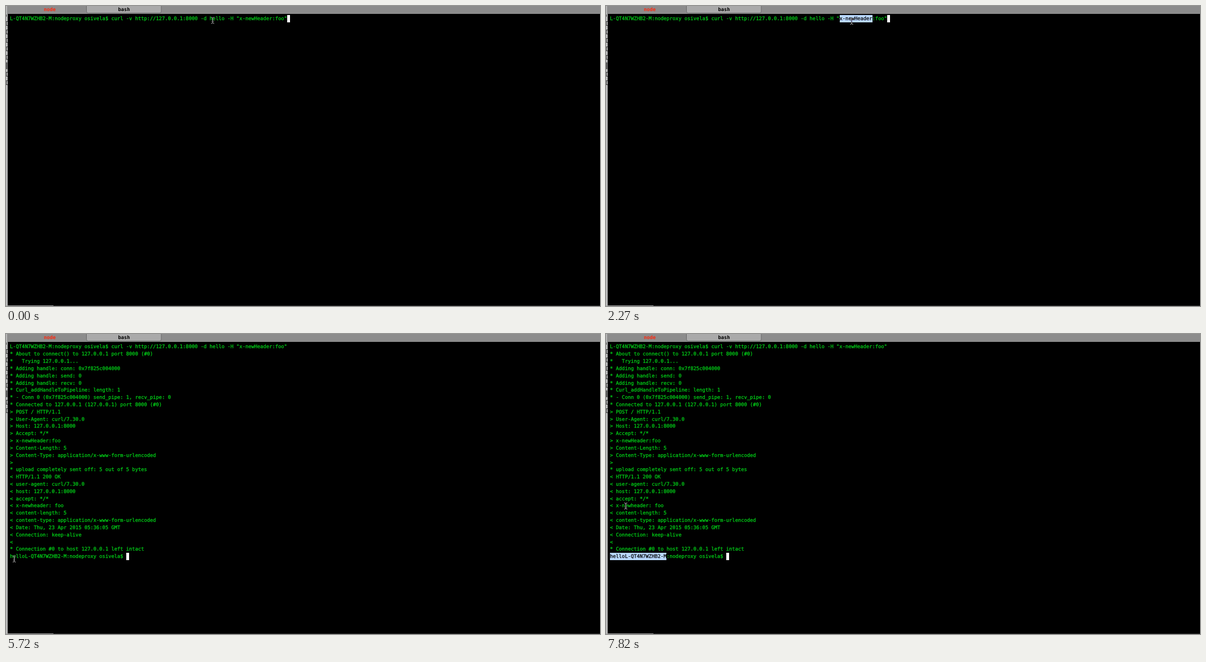
Animation, 1052 px wide and 532 px high, one loop 8000 ms. Source, as an HTML page with a canvas:

```html
<!DOCTYPE html>
<html lang="en">
<head>
<meta charset="utf-8">
<title>Terminal</title>
<style>
  html, body { margin: 0; width: 100%; height: 100%; overflow: hidden; background: #000; }
  canvas { display: block; }
</style>
</head>
<body>
<canvas id="stage" width="1052" height="532"></canvas>
<script>
const ctx = document.getElementById('stage').getContext('2d');
const LOOP = 8000, STEP = 150;
const LEFT = 7, TOP = 16, COL = 5.28, ROW = 12.82;
const FONT = '8.77px "DejaVu Sans Mono", monospace';

const prompt = 'L-QT4N7WZHB2-M:nodeproxy osivela$ ';
const lines = [
  prompt + 'curl -v http://127.0.0.1:8000 -d hello -H "x-newHeader:foo"',
  '* About to connect() to 127.0.0.1 port 8000 (#0)',
  '*   Trying 127.0.0.1...',
  '* Adding handle: conn: 0x7f825c004000',
  '* Adding handle: send: 0',
  '* Adding handle: recv: 0',
  '* Curl_addHandleToPipeline: length: 1',
  '* - Conn 0 (0x7f825c004000) send_pipe: 1, recv_pipe: 0',
  '* Connected to 127.0.0.1 (127.0.0.1) port 8000 (#0)',
  '> POST / HTTP/1.1',
  '> User-Agent: curl/7.30.0',
  '> Host: 127.0.0.1:8000',
  '> Accept: */*',
  '> x-newHeader:foo',
  '> Content-Length: 5',
  '> Content-Type: application/x-www-form-urlencoded',
  '>',
  '* upload completely sent off: 5 out of 5 bytes',
  '< HTTP/1.1 200 OK',
  '< user-agent: curl/7.30.0',
  '< host: 127.0.0.1:8000',
  '< accept: */*',
  '< x-newheader: foo',
  '< content-length: 5',
  '< content-type: application/x-www-form-urlencoded',
  '< Date: Thu, 23 Apr 2015 05:36:05 GMT',
  '< Connection: keep-alive',
  '<',
  '* Connection #0 to host 127.0.0.1 left intact',
  'hello' + prompt
];
const OUTPUT_AT = 3620;

const selections = [
  { from: 750, to: 2120, row: 0, word: 'hello' },
  { from: 2270, to: 5720, row: 0, word: 'x-newHeader' },
  { from: 5870, to: LOOP, row: 29, word: 'helloL-QT4N7WZHB2-M' }
];

// Pointer glides: start time, steps, bend point, end point, easing
const smooth = p => (1 - Math.cos(Math.PI * p)) / 2;
const slowing = p => Math.sin(Math.PI * p / 2);
const start = [366, 25.5];
const glides = [
  { at: 1370, steps: 4, bend: [400, 10], end: [435, 27], ease: smooth },
  { at: 4370, steps: 7, bend: [200, 215], end: [14.5, 399], ease: smooth },
  { at: 6170, steps: 3, bend: [38, 300], end: [56, 227], ease: smooth },
  { at: 6620, steps: 4, bend: [44, 272], end: [40, 312], ease: slowing },
  { at: 7220, steps: 5, bend: [35, 296], end: [35, 305], ease: smooth }
];

function pointerAt(t) {
  let pos = start;
  for (const g of glides) {
    if (t < g.at) break;
    const step = Math.min(Math.floor((t - g.at) / STEP) + 1, g.steps);
    const u = g.ease(step / g.steps), v = 1 - u;
    pos = pos.map((a, i) => a * v * v + 2 * u * v * g.bend[i] + g.end[i] * u * u);
  }
  return pos;
}

function rect(color, x, y, w, h) {
  ctx.fillStyle = color;
  ctx.fillRect(x, y, w, h);
}

// Fills character cells, snapped to whole pixels
function cells(color, row, col, count) {
  const x = Math.round(LEFT + col * COL);
  const right = Math.round(LEFT + (col + count) * COL);
  rect(color, x, Math.round(TOP + row * ROW), right - x, 13);
}

// A hairline stroke gives the glyphs their full weight
function text(str, row, col, color) {
  const x = LEFT + col * COL, y = TOP + row * ROW + 9.4;
  ctx.fillStyle = ctx.strokeStyle = color;
  ctx.lineWidth = 0.25;
  ctx.fillText(str, x, y);
  ctx.strokeText(str, x, y);
}

function drawWindow() {
  rect('#000', 0, 0, 1052, 532);
  rect('#b8b8b8', 0, 0, 3, 532);
  // Edges of the window behind
  for (let y = 27; y < 140; y += 15) {
    rect('#333', 0, y, 1, 8);
    rect('#333', 0, y, 3, 1);
    rect('#333', 0, y + 7, 3, 1);
  }
  rect('#777', 0, 100, 3, 12);
  rect('#333', 0, 100, 1, 12);
  rect('#444', 0, 15, 1, 4);
  rect('#a8a8a8', 0, 531, 84, 1);
  rect('#2a2a2a', 84, 531, 968, 1);
  rect('#8c8c8c', 2, 0, 1050, 14);

  ctx.beginPath();
  ctx.roundRect(142.5, -5, 132.5, 17.5, 3);
  ctx.fillStyle = '#aaa';
  ctx.fill();
  ctx.strokeStyle = '#686868';
  ctx.lineWidth = 1;
  ctx.stroke();

  ctx.font = 'bold ' + FONT;
  ctx.textAlign = 'center';
  ctx.fillStyle = '#ff2a10';
  ctx.fillText('node', 77.5, 9);
  ctx.fillStyle = '#000';
  ctx.fillText('bash', 209, 8.5);
  ctx.textAlign = 'left';
  ctx.font = FONT;
}

function drawPointer([x, y]) {
  ctx.save();
  ctx.translate(x, y);
  ctx.globalCompositeOperation = 'difference';
  ctx.strokeStyle = '#d8d8d8';
  ctx.lineWidth = 1;
  ctx.beginPath();
  for (const s of [-1, 1]) {
    ctx.moveTo(-2.5, 5.5 * s);
    ctx.quadraticCurveTo(-0.3, 5.3 * s, 0, 4 * s);
    ctx.quadraticCurveTo(0.3, 5.3 * s, 2.5, 5.5 * s);
  }
  ctx.moveTo(0, -4);
  ctx.lineTo(0, 4);
  ctx.moveTo(-1.5, 2);
  ctx.lineTo(1.5, 2);
  ctx.stroke();
  ctx.restore();
}

function draw(t) {
  drawWindow();
  const last = t < OUTPUT_AT ? 0 : lines.length - 1;
  for (let i = 0; i <= last; i++) text(lines[i], i, 0, '#00d418');
  for (const { from, to, row, word } of selections) {
    if (t < from || t >= to) continue;
    const col = lines[row].indexOf(word);
    cells('#b9d8ff', row, col, word.length);
    text(word, row, col, '#000');
  }
  cells('#fff', last, lines[last].length, 1);
  drawPointer(pointerAt(t));
}

ctx.textRendering = 'geometricPrecision';
function tick() {
  draw(performance.now() % LOOP);
  requestAnimationFrame(tick);
}
tick();
</script>
</body>
</html>
```
